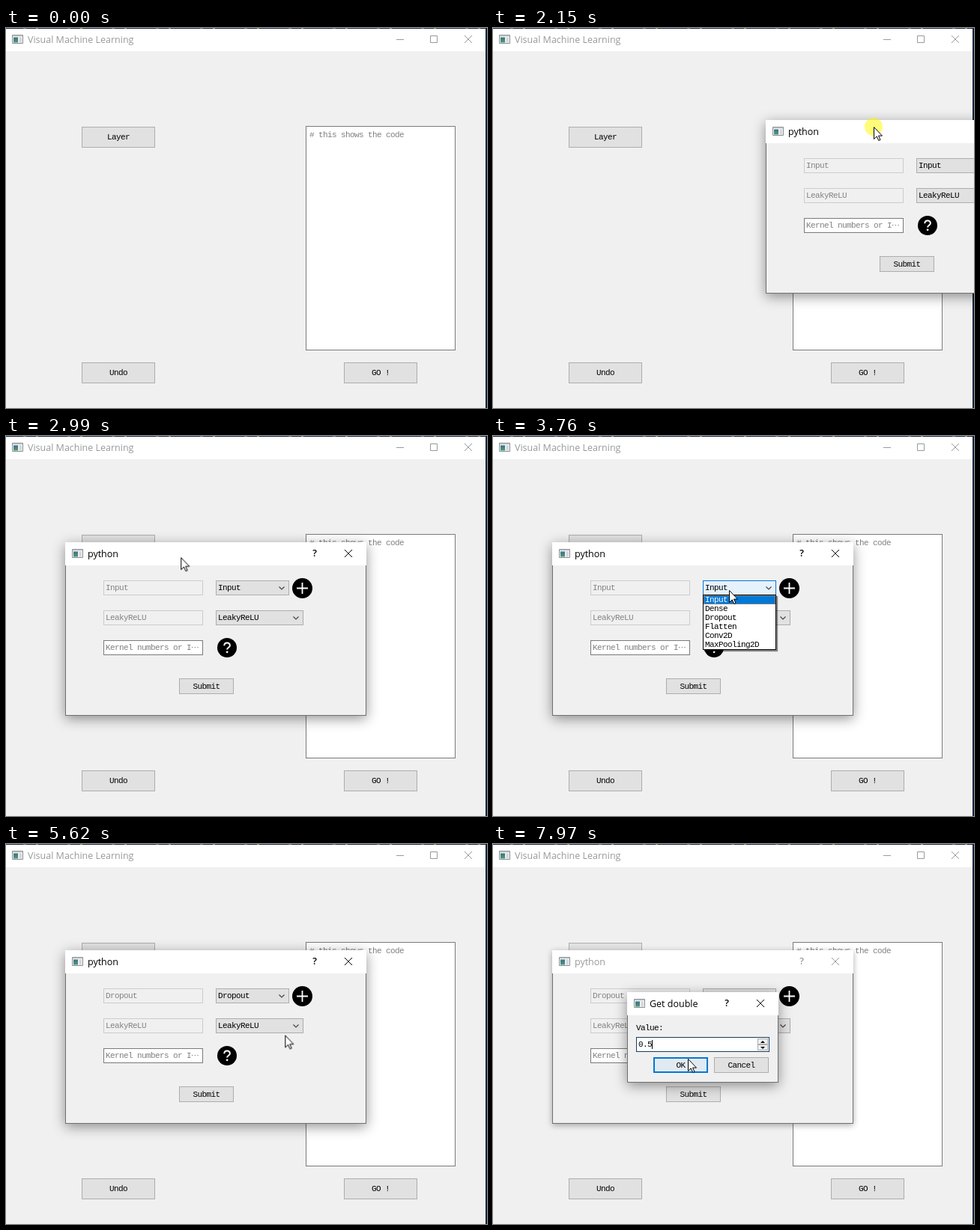
These frames come from a looping animation (642 by 508 pixels, 8000 ms). An HTML page:

```html
<!DOCTYPE html>
<html lang="en">
<head>
<meta charset="utf-8">
<title>Visual Machine Learning</title>
<style>
  html, body { margin: 0; width: 100%; height: 100%; overflow: hidden; background: #f0f0f0; }
  * { box-sizing: border-box; }
  #stage {
    position: relative; width: 642px; height: 508px; overflow: hidden; background: #f0f0f0;
    font: 11px/12px "Liberation Mono", "DejaVu Sans", monospace; letter-spacing: -.6px; color: #000;
    white-space: pre;
  }
  #stage * { animation-duration: 8s; animation-iteration-count: infinite; animation-timing-function: linear; }
  .box, .bar svg, .round, .caret {
    position: absolute; left: calc(var(--x) * 1px); top: calc(var(--y) * 1px);
    width: calc(var(--w) * 1px); height: calc(var(--h) * 1px);
  }
  svg { display: block; position: absolute; overflow: visible; }

  /* window chrome */
  .desk { background: #17263d; }
  .desk.top { background: repeating-linear-gradient(90deg, #17263d 0 23px, #55606c 23px 27px, #17263d 27px 40px, #8a7b4c 40px 43px, #17263d 43px 59px); }
  .bar {
    position: absolute; left: 0; top: 0; width: 100%; height: 31px; background: #fff;
    font: 12.5px/30px "Open Sans", "Noto Sans", sans-serif; letter-spacing: 0; color: #000;
  }
  .bar .name { position: absolute; left: 30px; top: 1px; }
  .bar .help { position: absolute; left: calc(var(--x) * 1px); top: 0; font-weight: 600; transform: translateX(-50%); }
  .bar .line { fill: none; stroke: currentColor; }
  .main { color: #999; top: 1px; width: 640px; height: 30px; animation-name: main-title; animation-timing-function: step-end !important; }
  .main .name { left: 29px; top: 0; }

  /* widgets */
  .btn, .combo { background: #e1e1e1; border: 1px solid #adadad; display: flex; align-items: center; }
  .btn { justify-content: center; }
  .combo { padding-left: 2px; }
  .combo svg { right: 5px; top: 7px; width: 8px; height: 5px; fill: none; stroke: #444; stroke-width: 1.2; }
  .field { background: #fff; border: 1px solid #7a7a7a; padding-left: 2px; display: flex; align-items: center; color: #808080; }
  .off { background: #f0f0f0; border-color: #ccc; color: #838383; }
  .code { align-items: flex-start; padding: 5px 4px; }
  .old, .new { animation-timing-function: step-end !important; }
  .old { animation-name: old; }
  .new { position: absolute; animation-name: new; }

  .dialog {
    position: absolute; background: #f0f0f0; outline: 1px solid #707070; outline-offset: -1px;
    box-shadow: 0 4px 16px rgba(0, 0, 0, .42);
  }
  #layer { width: 402px; height: 232px; left: 0; top: 0; animation-name: layer-open, drag, layer-shadow; }
  #layer .bar { animation-name: layer-title; }
  #value { width: 202px; height: 121px; left: 179px; top: 198px; animation-name: value-open; }
  #layer-btn { animation-name: layer-btn; }
  #kind { animation-name: kind; }
  #act { animation-name: act; }

  #list {
    background: #fff; border: 1px solid #000; box-shadow: 2px 2px 1px rgba(0, 0, 0, .45);
    animation-name: list; animation-timing-function: step-end;
  }
  #list > span { position: absolute; left: 2px; top: 0; }
  #pick {
    position: absolute; left: 0; width: 96px; height: 12px; top: calc(var(--row) * 12px); overflow: hidden;
    background: #0078d7; color: #fff; outline: 1px dotted #ff8728; outline-offset: -1px;
    animation-name: pick; animation-timing-function: step-end !important;
  }
  #pick span { position: absolute; left: 2px; top: calc(var(--row) * -12px); }

  #spin { color: #000; border-color: #0078d7; animation-name: spin; }
  #chosen { background: #0078d7; color: #fff; width: 18px; animation-name: chosen; }
  #typed { position: absolute; left: 2px; overflow: hidden; animation-name: typed; }
  #caret { background: #000; animation-name: caret; }
  #chosen, #typed, #caret { animation-timing-function: step-end !important; }
  .step { background: #f0f0f0; border: 1px solid #adadad; }
  .step svg { left: 3px; top: 2px; }
  #ok { border: 2px solid #0078d7; animation-name: ok; }

  #pointer { position: absolute; left: 0; top: 0; animation-name: pointer-move, pointer-show; animation-timing-function: ease-in-out, step-end !important; }
  #halo { fill: rgba(255, 250, 0, .52); animation-name: halo; animation-timing-function: step-end !important; }

  @keyframes main-title { 0%, 17% { color: #999; } 15.25% { color: #000; } }
  @keyframes layer-btn {
    0%, 8.25% { background: #e1e1e1; border-color: #adadad; }
    9.25%, 15.24% { background: #e5f1fb; border-color: #0078d7; }
    15.25%, 16.5% { background: #cce4f7; border-color: #005499; }
    19%, 100% { background: #e1e1e1; border-color: #adadad; }
  }
  @keyframes layer-open {
    0%, 16.75% { opacity: 0; scale: .9; }
    18.25% { opacity: .83; scale: .987; }
    20%, 100% { opacity: 1; scale: 1; }
  }
  @keyframes drag {
    0%, 27% { translate: 364px 123px; animation-timing-function: ease-in; }
    32.75% { translate: 113px 139px; animation-timing-function: ease-out; }
    35.625%, 100% { translate: 79px 142px; }
  }
  @keyframes layer-shadow {
    0%, 74% { box-shadow: 0 4px 16px rgba(0, 0, 0, .42); }
    76%, 100% { box-shadow: 0 2px 8px rgba(0, 0, 0, .33); }
  }
  @keyframes layer-title { 0%, 74.5% { color: #000; } 75.5%, 100% { color: #999; } }
  @keyframes kind {
    0%, 41.5% { background: #e1e1e1; border-color: #adadad; }
    42.8%, 47.5% { background: #e5f1fb; border-color: #0078d7; }
    51%, 62.87% { background: #cce4f7; border-color: #1a68a8; }
    65%, 100% { background: #e1e1e1; border-color: #adadad; }
  }
  @keyframes act {
    0%, 63% { background: #e1e1e1; border-color: #adadad; }
    64%, 65% { background: #e5f1fb; border-color: #0078d7; }
    67%, 100% { background: #e1e1e1; border-color: #adadad; }
  }
  @keyframes list { 0%, 63% { opacity: 0; } 45.6% { opacity: 1; } }
  @keyframes pick { 0% { --row: 0; } 52% { --row: 1; } 52.8% { --row: 2; } 54% { --row: 3; } 59.7%, 100% { --row: 2; } }
  @keyframes old { 0% { opacity: 1; } 63.75%, 100% { opacity: 0; } }
  @keyframes new { 0% { opacity: 0; } 63.75%, 100% { opacity: 1; } }
  @keyframes value-open {
    0%, 74.8% { opacity: 0; scale: .9; }
    77.25% { opacity: .95; scale: 1; }
    78.5%, 100% { opacity: 1; scale: 1; }
  }
  @keyframes spin { 0%, 97.5% { border-color: #0078d7; } 99.6%, 100% { border-color: #173e60; } }
  @keyframes ok { 0%, 97.8% { background: #e1e1e1; } 99.6%, 100% { background: #e2eaf1; } }
  @keyframes chosen { 0% { opacity: 1; } 88.875%, 100% { opacity: 0; } }
  @keyframes typed { 0% { width: 0; } 88.875% { width: 6px; } 91.75% { width: 12px; } 95.625%, 100% { width: 18px; } }
  @keyframes caret {
    0% { left: 2px; opacity: 1; }
    87% { left: 2px; opacity: 0; }
    88.875% { left: 8px; opacity: 1; }
    91.75% { left: 14px; opacity: 1; }
    95.625%, 100% { left: 20px; opacity: 1; }
  }
  @keyframes pointer-move {
    0%, 1.5% { translate: 443px 415px; }
    9.25%, 13.12% { translate: 122px 152px; }
    13.125%, 19.5% { translate: 125px 147px; }
    25% { translate: 508px 132px; }
    27% { translate: 508px 132px; animation-timing-function: ease-in; }
    32.75% { translate: 251px 148px; animation-timing-function: ease-out; }
    35.625% { translate: 223px 151px; }
    36.375% { translate: 223px 151px; animation-timing-function: ease-in; }
    39.5% { translate: 292px 226px; animation-timing-function: linear; }
    41.25% { translate: 310px 233px; animation-timing-function: ease-out; }
    43.125%, 49% { translate: 315px 206px; }
    55.75%, 57.75% { translate: 317px 257px; }
    60.625%, 62.875% { translate: 318px 247px; }
    67.5% { translate: 352px 334px; }
    72.375%, 73.25% { translate: 385px 206px; }
    77.25% { translate: 371px 301px; }
    81.125% { translate: 300px 268px; }
    97.5% { translate: 236px 268px; }
    99.6%, 100% { translate: 260px 287px; }
  }
  @keyframes pointer-show { 0%, 81.125% { opacity: 0; } 1.5%, 97.5%, 100% { opacity: 1; } }
  @keyframes halo {
    0%, 17%, 36.375%, 46.5%, 64.4%, 74.8%, 100% { opacity: 0; }
    15.25%, 26%, 45%, 62.875%, 73.25% { opacity: 1; }
  }
</style>
</head>
<body>
<svg width="0" height="0">
  <defs>
    <linearGradient id="teal" x2="0" y2="1"><stop stop-color="#3f6f8c"/><stop offset="1" stop-color="#4d9a78"/></linearGradient>
    <symbol id="icon" viewBox="0 0 15 12">
      <path d="M.5.5h14v11H.5z" fill="#f4f4f4" stroke="#8a8f93"/>
      <path d="M1 1h13v1.5H1z" fill="#c9cdd0"/>
      <path d="M2 3.5h6v7H2z" fill="url(#teal)"/>
      <path d="M9.5 3.5h3.5v7H9.5z" fill="#d3d8db"/>
    </symbol>
    <path id="cross" d="M0 0l10 10M10 0L0 10"/>
    <path id="chevron" d="M.5.5L4 4 7.5.5"/>
  </defs>
</svg>
<div id="stage">
  <div class="box desk top" style="--x:0;--y:0;--w:642;--h:1"></div>
  <div class="box desk" style="--x:640;--y:0;--w:2;--h:508"></div>

  <div class="bar main">
    <svg style="--x:8;--y:8;--w:15;--h:12"><use href="#icon"/></svg>
    <span class="name">Visual Machine Learning</span>
    <svg class="line" style="--x:521;--y:9;--w:102;--h:11"><path d="M0 5.5h10M45.5.5h9v9h-9z"/><use href="#cross" x="91"/></svg>
  </div>
  <div id="layer-btn" class="box btn" style="--x:101;--y:132;--w:98;--h:28">Layer</div>
  <div class="box btn" style="--x:101;--y:447;--w:98;--h:28">Undo</div>
  <div class="box btn" style="--x:451;--y:447;--w:98;--h:28">GO !</div>
  <div class="box field code" style="--x:400;--y:131;--w:200;--h:300"># this shows the code</div>

  <div id="layer" class="dialog">
    <div class="bar">
      <svg style="--x:9;--y:9;--w:15;--h:12"><use href="#icon"/></svg>
      <span class="name">python</span>
      <span class="help" style="--x:333">?</span>
      <svg class="line" style="--x:373;--y:10;--w:10;--h:10"><use href="#cross"/></svg>
    </div>
    <div class="box field off" style="--x:51;--y:51;--w:133;--h:20"><span class="old">Input</span><span class="new">Dropout</span></div>
    <div id="kind" class="box combo" style="--x:201;--y:51;--w:98;--h:20"><span class="old">Input</span><span class="new">Dropout</span><svg><use href="#chevron"/></svg></div>
    <svg class="round" style="--x:303;--y:48;--w:27;--h:27"><circle cx="13.5" cy="13.5" r="13.5"/><path d="M6 13.5h15M13.5 6v15" stroke="#fff" stroke-width="1.8"/></svg>
    <div class="box field off" style="--x:51;--y:91;--w:133;--h:20">LeakyReLU</div>
    <div id="act" class="box combo" style="--x:201;--y:91;--w:117;--h:20">LeakyReLU<svg><use href="#chevron"/></svg></div>
    <div class="box field" style="--x:51;--y:131;--w:133;--h:20">Kernel numbers or I⋯</div>
    <svg class="round" style="--x:203;--y:128;--w:26;--h:26"><circle cx="13" cy="13" r="13"/><path d="M9.3 10.3c0-5 7.6-4.8 7.6-.4 0 2.7-3.8 2.9-3.8 5.6" fill="none" stroke="#fff" stroke-width="2"/><circle cx="13.1" cy="18.8" r="1.4" fill="#fff"/></svg>
    <div class="box btn" style="--x:152;--y:182;--w:73;--h:21">Submit</div>
    <div id="list" class="box" style="--x:201;--y:70;--w:98;--h:74"><span>Input
Dense
Dropout
Flatten
Conv2D
MaxPooling2D</span><div id="pick"><span>Input
Dense
Dropout
Flatten
Conv2D
MaxPooling2D</span></div></div>
  </div>

  <div id="value" class="dialog">
    <div class="bar">
      <svg style="--x:9;--y:9;--w:15;--h:12"><use href="#icon"/></svg>
      <span class="name">Get double</span>
      <span class="help" style="--x:133">?</span>
      <svg class="line" style="--x:173;--y:10;--w:10;--h:10"><use href="#cross"/></svg>
    </div>
    <div class="box" style="--x:12;--y:42;--w:40;--h:12">Value:</div>
    <div id="spin" class="box field" style="--x:12;--y:60;--w:178;--h:20">
      <span id="chosen">0.0</span><span id="typed">0.5</span>
      <i id="caret" class="caret" style="--x:2;--y:3;--w:1;--h:12"></i>
      <div class="box step" style="--x:161;--y:1;--w:14;--h:8"><svg width="6" height="3"><path d="M0 3h6L3 0z"/></svg></div>
      <div class="box step" style="--x:161;--y:9;--w:14;--h:8"><svg width="6" height="3"><path d="M0 0h6L3 3z"/></svg></div>
    </div>
    <div id="ok" class="box btn" style="--x:35;--y:87;--w:73;--h:21">OK</div>
    <div class="box btn" style="--x:116;--y:87;--w:73;--h:21">Cancel</div>
  </div>

  <svg id="pointer" width="12" height="19">
    <circle id="halo" r="12"/>
    <path d="M.5.5v16l3.7-3.6 2.6 5.6 2.2-1-2.5-5.4h5z" fill="#fff" stroke="#000"/>
  </svg>
</div>
</body>
</html>
```
